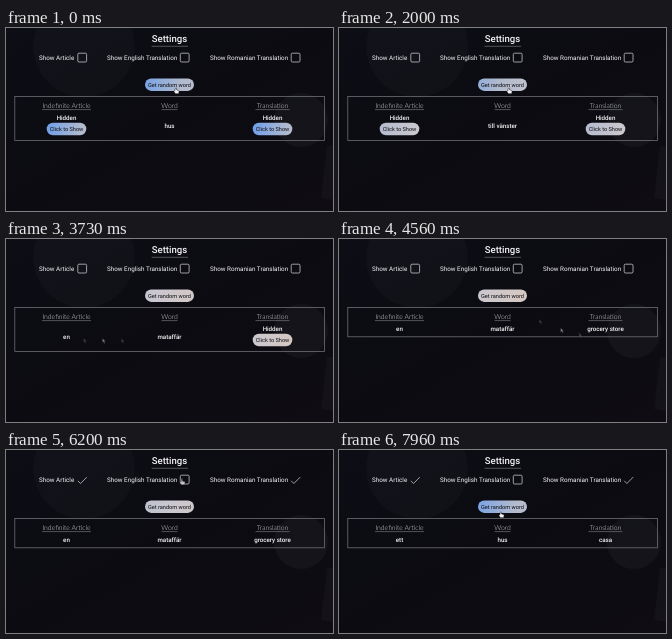
Animation, 327 px wide and 183 px high, one loop 8 s. Source, as an HTML page:

```html
<!DOCTYPE html>
<html lang="en">
<head>
<meta charset="utf-8">
<title>Vocabulary trainer</title>
<style>
  html, body { margin: 0; width: 100%; height: 100%; overflow: hidden; background: #0b0b11; }
  svg { display: block; width: 100%; height: 100%; }
  text { font: 500 6.2px Roboto, sans-serif; fill: #f4f4f6; text-anchor: middle; text-rendering: geometricPrecision; }
  .title { font-size: 9.6px; }
  .label { font-size: 6.3px; font-weight: 400; text-anchor: start; }
  .head { font: 300 6.8px Lato, sans-serif; fill: #d8d8de; }
  .btn { font-size: 5.6px; font-weight: 400; fill: #0b0b10; }
  .rule { stroke: #8d8d93; stroke-width: .55; }
  .box, .tick { fill: none; stroke: #dcdce0; stroke-width: .7; }
</style>
</head>
<body>
<svg id="stage" viewBox="0 0 327 183">
  <defs>
    <linearGradient id="bg" x1="0" y1="0" x2="1" y2="1">
      <stop offset="0" stop-color="#0d0d15"/>
      <stop offset=".5" stop-color="#0b0b11"/>
      <stop offset="1" stop-color="#0f0d13"/>
    </linearGradient>
  </defs>
  <rect width="327" height="183" fill="url(#bg)"/>
  <g fill="#aab">
    <circle cx="295" cy="92" r="27" opacity=".05"/>
    <circle cx="78" cy="18" r="51" opacity=".03"/>
    <path d="M321 118h6v54l-12-2z" opacity=".04"/>
  </g>
</svg>
<script>
const LOOP = 8000;
const stage = document.getElementById('stage');

function add(tag, attrs, parent = stage, text = '') {
  const el = document.createElementNS('http://www.w3.org/2000/svg', tag);
  for (const k in attrs) el.setAttribute(k, attrs[k]);
  el.textContent = text;
  parent.appendChild(el);
  return el;
}
const label = (x, y, text, cls = '', parent = stage) => add('text', { x, y, class: cls }, parent, text);
const rule = (x1, x2, y) => add('line', { x1, x2, y1: y, y2: y, class: 'rule' });
const show = (el, on) => el.setAttribute('visibility', on ? 'visible' : 'hidden');

// Settings row
label(163.5, 14.4, 'Settings', 'title');
rule(145.5, 182, 18.3);

function checkbox(x, labelX, text) {
  label(labelX, 31.8, text, 'label');
  const box = add('rect', { x, y: 25.2, width: 8.8, height: 8.8, rx: 1.2, class: 'box' });
  const tick = add('path', { d: `M${x} 30.8l2.7 2.7l6.3-6.4`, class: 'tick' });
  return on => { show(box, !on); show(tick, on); };
}
const setArticle = checkbox(71.8, 33, 'Show Article');
const setEnglish = checkbox(174.3, 101, 'Show English Translation');
const setRomanian = checkbox(285.2, 204, 'Show Romanian Translation');
setEnglish(false);

// Buttons share one sliding gradient look
const STOPS = [[0, '#6f9fea'], [.3, '#b2bacd'], [.62, '#c9c7cf'], [1, '#d6c8c2']];

function button(id, x, y, w, text, start) {
  const grad = add('linearGradient', { id, gradientUnits: 'userSpaceOnUse', y1: y, y2: y + 12 });
  STOPS.forEach(([offset, c]) => add('stop', { offset, 'stop-color': c }, grad));
  const g = add('g', {});
  add('rect', { x, y, width: w, height: 12.4, rx: 6.2, fill: `url(#${id})` }, g);
  label(x + w / 2, y + 8.3, text, 'btn', g);
  return {
    g,
    slide(t) {
      const p = .5 - .5 * Math.cos((t - start) / LOOP * 2 * Math.PI);
      const x1 = x - p * 2 * w;
      grad.setAttribute('x1', x1);
      grad.setAttribute('x2', x1 + 3 * w);
    }
  };
}

// Word table
const frame = add('rect', { x: 8.8, y: 68.6, width: 309.6, height: 44, fill: 'none', stroke: '#737379', 'stroke-width': .75 });
const COLS = [60.5, 163.5, 266.5];
[['Indefinite Article', 24.5], ['Word', 8], ['Translation', 17]].forEach(([text, half], i) => {
  label(COLS[i], 79.8, text, 'head');
  rule(COLS[i] - half, COLS[i] + half, 81.6);
});
const cells = COLS.map(x => label(x, 92.3, ''));

const random = button('random', 139, 50.5, 49, 'Get random word', 700);
const revealA = button('revealA', 40.7, 94.8, 39.6, 'Click to Show', 0);
const revealT = button('revealT', 246.7, 94.8, 39.6, 'Click to Show', 0);

const WORDS = [
  [0, '', 'hus', ''],
  [480, '', 'till vänster', ''],
  [2430, 'en', 'mataffär', 'grocery store'],
  [6660, '—', 'häftigt', 'misto'],
  [7420, 'ett', 'hus', 'casa']
];
const SHOW_A = 3560, SHOW_T = 4280, CHECK_A = 5120, CHECK_R = 5850;

// Pointer: time, x, y
const PATH = [
  [0, 170, 60], [3000, 170, 60], [3400, 62, 99], [3640, 62, 99],
  [4180, 266, 100], [4440, 266, 100], [4560, 222, 89], [4900, 77, 30],
  [5180, 77, 30], [5640, 290, 30], [5930, 290, 30], [6140, 176, 29],
  [6260, 176, 29], [6480, 162, 62], [8000, 162, 62]
];

function pointAt(t) {
  let i = 1;
  while (i < PATH.length - 1 && PATH[i][0] < t) i++;
  const [t0, x0, y0] = PATH[i - 1], [t1, x1, y1] = PATH[i];
  const k = Math.min(1, Math.max(0, (t - t0) / (t1 - t0)));
  return [x0 + (x1 - x0) * k, y0 + (y1 - y0) * k];
}

const HAND = 'M-.6 0q.6-.8 1.2 0v2l2 .5q.7.2.5 1l-.5 2.2h-3.2l-1.6-2.4q.2-.8 1-.3z';
const ARROW = 'M0 0v4.6l1.1-1 .8 1.8.8-.4-.8-1.7h1.5z';
const pointers = [-50, 50, 0].map(lag => ({
  lag,
  el: add('path', { fill: '#fff', stroke: '#15151a', 'stroke-width': .5 })
}));

const inside = (x, y, l, r, top, bottom) => x > l && x < r && y > top && y < bottom;

function drawPointers(t, gotA, gotT) {
  const [ax, ay] = pointAt(t - 100), [bx, by] = pointAt(t + 100);
  const moving = Math.hypot(bx - ax, by - ay) > 1;
  pointers.forEach(({ lag, el }) => {
    const [x, y] = pointAt(t + lag);
    const hand = inside(x, y, 139, 188, 50, 63)
      || !gotA && inside(x, y, 40, 81, 94, 108)
      || !gotT && inside(x, y, 246, 287, 94, 108)
      || [71, 173, 284].some(l => inside(x, y, l, l + 11, 24, 35));
    el.setAttribute('d', hand ? HAND : ARROW);
    el.setAttribute('transform', `translate(${x} ${y})`);
    el.setAttribute('opacity', lag ? (moving ? .22 : 0) : (moving ? .5 : .95));
  });
}

function draw(t) {
  const row = WORDS.filter(w => w[0] <= t).pop();
  const gotA = t >= SHOW_A, gotT = t >= SHOW_T;
  const baseline = gotA && gotT ? 92.3 : 100;

  [gotA, true, gotT].forEach((open, i) => {
    cells[i].textContent = open ? row[i + 1] : 'Hidden';
    cells[i].setAttribute('y', open ? baseline : 92.3);
  });
  frame.setAttribute('height', gotA && gotT ? 29.2 : 44);
  show(revealA.g, !gotA);
  show(revealT.g, !gotT);
  [random, revealA, revealT].forEach(b => b.slide(t));
  setArticle(t >= CHECK_A);
  setRomanian(t >= CHECK_R);
  drawPointers(t, gotA, gotT);
}

const begin = performance.now();
function tick() {
  draw((performance.now() - begin) % LOOP);
  requestAnimationFrame(tick);
}
tick();
</script>
</body>
</html>
```
